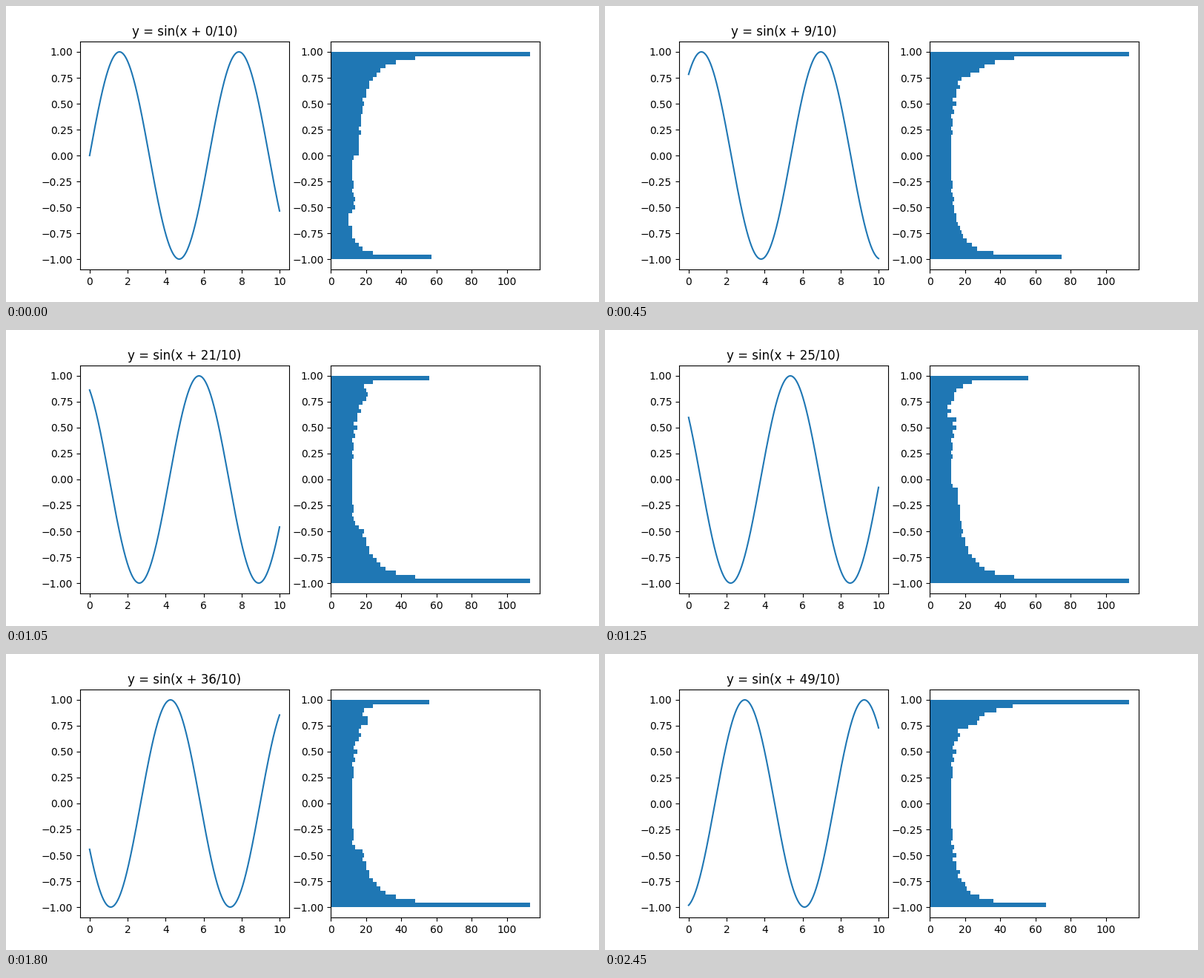
Write a matplotlib script that moves like this. It is 800 px wide and 400 px high and loops after 2.5 s.

```python
import matplotlib.pyplot as plt
import numpy as np
from matplotlib.animation import FuncAnimation

FRAMES = 50
INTERVAL = 50  # ms
BINS = 50

fig, (wave_ax, hist_ax) = plt.subplots(1, 2, figsize=(8, 4), dpi=100)
x = np.arange(0, 10, 0.01)


def draw(step):
    """Plot the shifted sine and the distribution of its values."""
    y = np.sin(x + step / 10)

    wave_ax.clear()
    wave_ax.plot(x, y)
    wave_ax.set_title(f"y = sin(x + {step}/10)")

    hist_ax.clear()
    hist_ax.hist(y, bins=BINS, orientation="horizontal")


anim = FuncAnimation(fig, draw, frames=FRAMES, init_func=lambda: draw(0),
                     interval=INTERVAL, repeat=True, repeat_delay=0)
plt.show()
```
